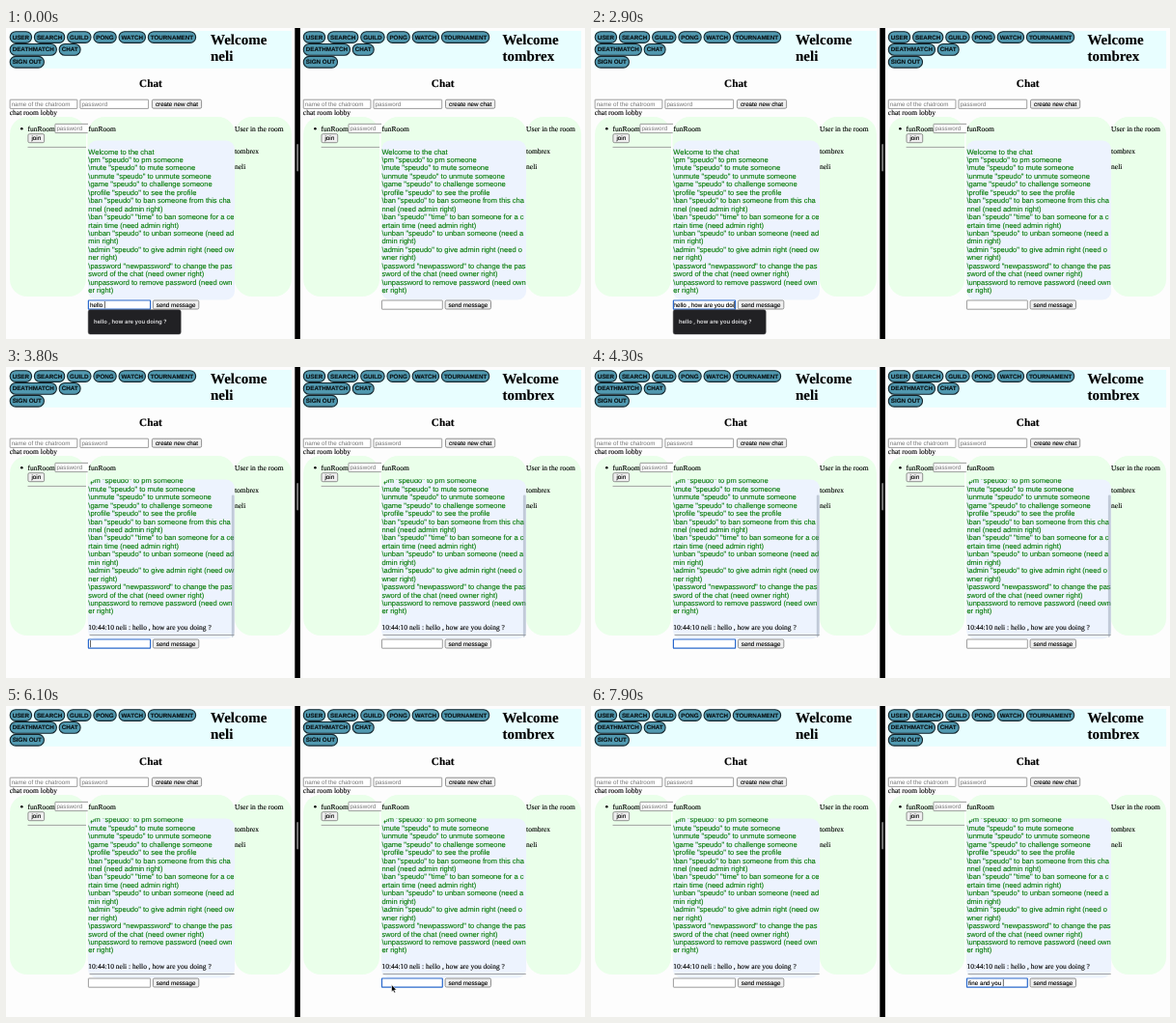
These frames come from a looping animation (600 by 322 pixels, 8000 ms). An HTML page:

```html
<!DOCTYPE html>
<html lang="en">
<head>
<meta charset="utf-8">
<title>Chat</title>
<style>
  html, body { margin: 0; width: 100%; height: 100%; overflow: hidden; background: #fdfdfd; }
  svg { display: block; width: 100vw; height: 100vh; }
  text { white-space: pre; text-rendering: geometricPrecision; font: 7.5px "Liberation Serif", Times, serif; stroke: #000; stroke-width: 0.12; }
  text.title { font-size: 15px; font-weight: bold; }
  text.sub { font-size: 11.25px; font-weight: bold; text-anchor: middle; }
  text.ui { font: 6.25px "Liberation Sans", Arial, sans-serif; }
  text.mid { text-anchor: middle; }
  text.pill { font-weight: bold; fill: #0a1418; }
  text.help { font: 7.5px "Liberation Sans", Arial, sans-serif; fill: #007a00; stroke: #007a00; }
  text.hint { font: 600 5.9px Inter, sans-serif; fill: #e2e2e4; stroke: none; }
  text.ghost { fill: #757575; stroke: none; }
</style>
</head>
<body>
<svg id="stage" viewBox="0 0 600 322"></svg>
<script>
const LOOP = 8000;
const USERS = ["neli", "tombrex"];
const MESSAGE = "hello , how are you doing ?";
const REPLY = "fine and you ";
const SENT = 3500, RECEIVED = 3800, FOCUS_SWAP = 5600;
const SCROLL = 18.6;

// "|" breaks lines in the wide panel, "¦" in the narrow one
const HELP = String.raw`Welcome to the chat
\pm "speudo" to pm someone
\mute "speudo" to mute someone
\unmute "speudo" to unmute someone
\game "speudo" to challenge someone
\profile "speudo" to see the profile
\ban "speudo" to ban someone from this cha¦|nnel (need admin right)
\ban "speudo" "time" to ban someone for a c¦e|rtain time (need admin right)
\unban "speudo" to unban someone (need a¦d|min right)
\admin "speudo" to give admin right (need o¦w|ner right)
\password "newpassword" to change the pas¦|sword of the chat (need owner right)
\unpassword to remove password (need own¦|er right)`;

const stage = document.getElementById("stage");

function add(parent, tag, attrs, content) {
  const el = document.createElementNS("http://www.w3.org/2000/svg", tag);
  for (const key in attrs) el.setAttribute(key, attrs[key]);
  if (content !== undefined) el.textContent = content;
  return parent.appendChild(el);
}
const box = (parent, x, y, width, height, fill, rx = 0, more = {}) =>
  add(parent, "rect", { x, y, width, height, fill, rx, ...more });
const label = (parent, x, y, content, cls = "") =>
  add(parent, "text", { x, y, class: cls }, content);
const rule = (parent, x, y, width) => box(parent, x, y, width, 0.9, "#999");
const show = (el, on) => el.setAttribute("visibility", on ? "visible" : "hidden");

function clip(parent, id, x, y, width, height, rx = 0) {
  box(add(parent, "clipPath", { id }), x, y, width, height, "#000", rx);
  return add(parent, "g", { "clip-path": `url(#${id})` });
}
function field(parent, x, y, width, placeholder = "") {
  const frame = box(parent, x + 0.4, y + 0.4, width - 0.8, 9.2, "#fff", 0.4,
    { stroke: "#858585", "stroke-width": 0.8 });
  label(parent, x + 1.9, y + 7.1, placeholder, "ui ghost");
  return frame;
}
function button(parent, x, y, width, content) {
  box(parent, x + 0.4, y + 0.4, width - 0.8, 9, "#efefef", 1.4,
    { stroke: "#767676", "stroke-width": 0.8 });
  label(parent, x + width / 2, y + 7, content, "ui mid");
}
function pills(parent, x, y, names) {
  for (const name of names) {
    const text = label(parent, 0, y + 8.4, name, "ui pill");
    const width = text.getComputedTextLength() + 5.6;
    text.setAttribute("x", x + 2.8);
    parent.insertBefore(box(parent, x + 0.3, y + 0.5, width - 0.6, 11.7, "#5199b0", 5.8,
      { stroke: "#14252c", "stroke-width": 1.1 }), text);
    x += width + 2.2;
  }
}

function buildPanel(index) {
  const narrow = index === 1;
  const g = add(stage, "g", { transform: `translate(${narrow ? 304.1 : 0} 0)` });
  const midWidth = narrow ? 150 : 152;
  const midEnd = 85 + midWidth;
  const pageEnd = narrow ? 292 : 296;

  box(g, 3.75, 3, pageEnd - 3.75, 38.8, "#e8feff");
  pills(g, 3.9, 3.2, ["USER", "SEARCH", "GUILD", "PONG", "WATCH", "TOURNAMENT"]);
  pills(g, 3.9, 16, ["DEATHMATCH", "CHAT"]);
  pills(g, 3.9, 28.9, ["SIGN OUT"]);
  const titleX = narrow ? 210.3 : 212;
  label(g, titleX, 16.5, "Welcome", "title");
  label(g, titleX, 34.1, USERS[index], "title");
  label(g, narrow ? 148.6 : 150, 61.4, "Chat", "sub");

  field(g, 3.75, 73.8, 70.5, "name of the chatroom");
  field(g, 76.5, 73.8, 71.5, "password");
  button(g, 151, 73.8, 52, "create new chat");
  label(g, 3.75, 90, "chat room lobby");

  const green = "#eaffea";
  box(g, 4, 92, 79, 186, green, 18);
  add(g, "circle", { cx: 16.3, cy: 104.2, r: 1.3 });
  label(g, 22.5, 106.8, "funRoom");
  field(g, 50.5, 99, 71, "password");
  button(g, 22.5, 109.3, 17.5, "join");
  rule(g, 22.5, 122.9, 60.5);

  box(g, 85, 92, midWidth, 26, "#fdfdfd");
  box(g, 84.5, 92, midWidth + 1, 186, green, 18);
  box(g, midEnd, 92, pageEnd - midEnd, 186, green, 18);
  box(g, 85, 116.5, midWidth, 165, "#edf3fe", 9);
  label(g, 85.5, 106.8, "funRoom");
  label(g, midEnd, 106.8, "User in the room");
  label(g, midEnd, 130, USERS[1]);
  label(g, midEnd, 145.6, USERS[0]);

  const chat = clip(g, "chat" + index, 85, 116.3, midWidth + 1, 165.5, 9);
  const feed = add(chat, "g", {});
  const [cut, skip] = narrow ? ["¦", "|"] : ["|", "¦"];
  HELP.replaceAll(skip, "").replaceAll(cut, "\n").split("\n")
    .forEach((line, i) => label(feed, 85.3, 130.6 + i * 8.4375, line, "help"));
  const news = add(feed, "g", {});
  label(news, 85.3, 271.9 + SCROLL, `10:44:10 ${USERS[0]} : ${MESSAGE}`);
  rule(news, 85, 277 + SCROLL, midWidth);
  const bar = box(chat, midEnd - 3.2, 132.5, 2.8, 147.5, "#8b98a8", 1.3);

  const inputWidth = narrow ? 63.6 : 65;
  const frame = field(g, 85, 281.6, inputWidth);
  button(g, 87 + inputWidth, 281.6, 48.2, "send message");
  const typed = label(clip(g, "typed" + index, 86.3, 282, inputWidth - 2.4, 10), 87, 288.8, "", "ui");
  const caret = box(g, 87, 283, 0.6, 7.2, "#000");
  return { feed, news, bar, frame, typed, caret };
}

const panels = [0, 1].map(buildPanel);
box(stage, 299.3, 0, 5.6, 322, "#000");
box(stage, 301.2, 120, 1.8, 28.5, "#7c7c7c", 0.9);

const hint = add(stage, "g", {});
box(hint, 85.2, 291.8, 96, 25.2, "#212124", 2, { stroke: "#3a3a3d", "stroke-width": 0.5 });
label(hint, 91, 306.4, MESSAGE, "hint");

const pointer = add(stage, "path", {
  d: "M0 0V7.4L1.7 5.9L2.8 8.4L4.1 7.8L3 5.4H5.2Z",
  stroke: "#fff", "stroke-width": 0.6
});

// Linear interpolation through [time, value] stops
function ramp(t, stops) {
  if (t <= stops[0][0]) return stops[0][1];
  for (let i = 1; i < stops.length; i++) {
    const [t0, a] = stops[i - 1], [t1, b] = stops[i];
    if (t <= t1) return a + (b - a) * (t - t0) / (t1 - t0);
  }
  return stops.at(-1)[1];
}

function drawField({ frame, typed, caret }, content, focused, blinkOn) {
  frame.setAttribute("stroke", focused ? "#2a69cc" : "#858585");
  frame.setAttribute("stroke-width", focused ? 1.2 : 0.8);
  typed.textContent = content;
  const width = content ? typed.getComputedTextLength() : 0;
  const shift = Math.min(0, 61 - width);
  typed.setAttribute("x", 87 + shift);
  caret.setAttribute("x", 87 + shift + width);
  show(caret, focused && blinkOn);
}

function draw(t) {
  const leftCount = Math.floor(ramp(t, [[0, 6], [1700, 13], [2900, 23], [3350, 27]]) + 0.01);
  const rightCount = Math.floor(ramp(t, [[6400, 0], [7900, 13]]) + 0.01);
  const blink = since => (t - since) % 1000 < 500;
  const leftFocus = t < FOCUS_SWAP;

  drawField(panels[0], t < SENT ? MESSAGE.slice(0, leftCount) : "", leftFocus, t < SENT || blink(SENT));
  drawField(panels[1], REPLY.slice(0, rightCount), !leftFocus, rightCount > 0 || blink(FOCUS_SWAP));
  show(hint, t < SENT);

  const received = t >= RECEIVED;
  for (const { feed, news, bar } of panels) {
    feed.setAttribute("transform", `translate(0 ${received ? -SCROLL : 0})`);
    show(news, received);
    show(bar, received);
    bar.setAttribute("opacity", ramp(t, [[4400, 0.45], [4700, 0]]));
  }

  const p = ramp(t, [[4900, 0], [5500, 1]]);
  const ease = p * p * (3 - 2 * p);
  pointer.setAttribute("transform", `translate(${372 + 27.5 * ease} ${324 - 35.4 * ease})`);
  show(pointer, t >= 4900 && t < 6450);
}

let start;
function tick(now) {
  start ??= now;
  draw((now - start) % LOOP);
  requestAnimationFrame(tick);
}
draw(0);
requestAnimationFrame(tick);
</script>
</body>
</html>
```
